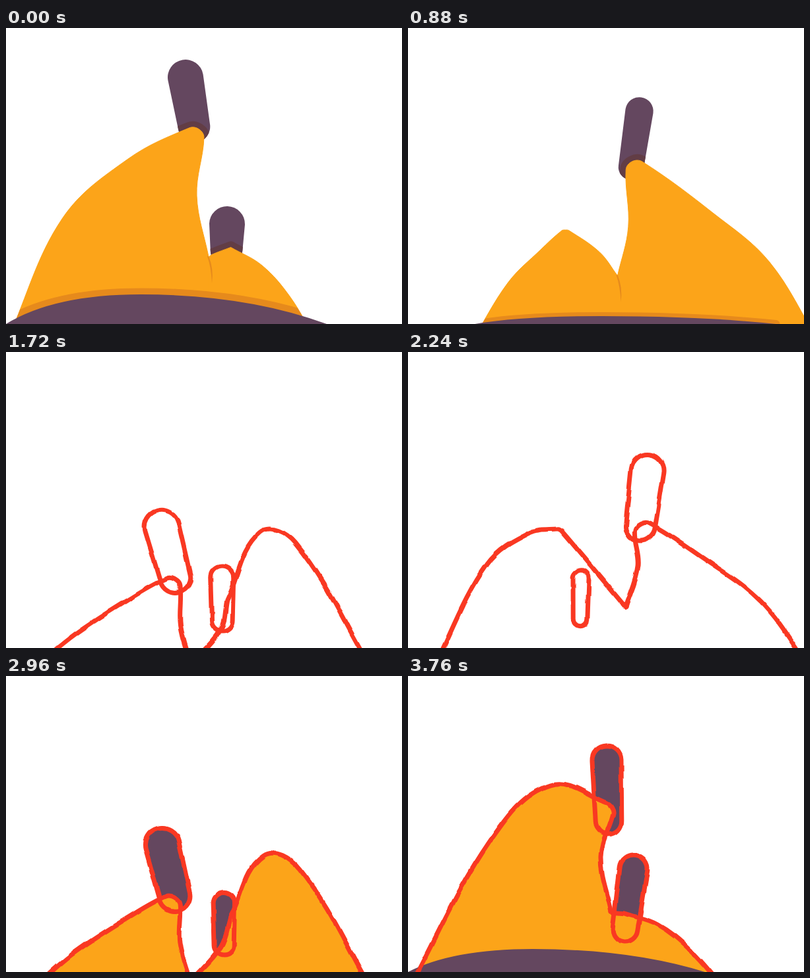
These frames come from a looping animation (600 px wide and 450 px high, 3.8 s). An HTML page:

```html
<!DOCTYPE html>
<html lang="en">
<head>
<meta charset="utf-8">
<title>Walk cycle</title>
<style>
html, body { margin: 0; width: 100%; height: 100%; overflow: hidden; background: #fff; }
svg { display: block; width: 100%; height: 100%; }
path { fill: none; stroke-linejoin: round; stroke-linecap: round; }
.shoe, .torso { fill: #64475f; }
.leg { fill: #fca419; stroke: #fca419; stroke-width: 1; }
.cuff { stroke: #623d45; stroke-width: 18; }
#band { stroke: #e68a1c; }
#crease { fill: #e68a1c; }
#ink path { stroke: #f93822; stroke-width: 7; }
</style>
</head>
<body>
<svg viewBox="0 0 600 450">
  <defs>
    <clipPath id="clipL"><path id="clipShoeL"/></clipPath>
    <clipPath id="clipR"><path id="clipShoeR"/></clipPath>
    <clipPath id="clipLegs"><path id="legsArea"/></clipPath>
    <filter id="handDrawn" filterUnits="userSpaceOnUse" x="-20" y="-20" width="640" height="490" color-interpolation-filters="sRGB">
      <feTurbulence id="noise" type="fractalNoise" baseFrequency="0.04" numOctaves="1" result="n"/>
      <feDisplacementMap in="SourceGraphic" in2="n" scale="6" xChannelSelector="R" yChannelSelector="G"/>
    </filter>
  </defs>
  <g id="paint">
    <path id="shoeL" class="shoe"/><path id="shoeR" class="shoe"/>
    <g class="shade">
      <g clip-path="url(#clipL)"><path id="cuffL" class="cuff"/></g>
      <g clip-path="url(#clipR)"><path id="cuffR" class="cuff"/></g>
    </g>
    <path id="legR" class="leg"/><path id="legL" class="leg"/>
    <g class="shade">
      <path id="crease"/>
      <g clip-path="url(#clipLegs)"><path id="band"/></g>
    </g>
    <path id="torso" class="torso"/>
  </g>
  <g id="ink" filter="url(#handDrawn)">
    <path id="inkShoeL"/><path id="inkShoeR"/><path id="inkLegL"/><path id="inkLegR"/>
  </g>
</svg>
<script>
const LOOP = 3800, STEP = 40, CYCLE = 1280, AXIS = 606, ANKLE = 17;
const $ = id => document.getElementById(id);

// leg: hip, thigh, knee, ankle centre, inner side; shoe: toe and heel centres;
// size: toe radius of each shoe; torso: left end, right end, top.
const pose = (t, crotch, legL, legR, shoeL, shoeR, size, torso) =>
  ({ t, crotch, legL, legR, shoeL, shoeR, size, torso });

const reachL = pose(0, [307,348],
  [4,470, 85,290, 185,199, 283,168, 289,255], [468,472, 430,408, 388,361, 337,350, 313,344],
  [272,75, 285,150], [335,298, 334,338], [27, 27], [0, 486, 405]);
const plantL = pose(120, [297,390],
  [0,472, 70,353, 150,272, 262,191, 277,290], [458,474, 425,436, 392,400, 343,394, 305,388],
  [256,98, 270,184], [321,370, 317,410], [22, 22], [40, 428, 425]);
const passR = pose(520, [286,478],
  [70,482, 130,442, 205,394, 255,388, 274,432], [556,480, 430,276, 374,263, 331,383, 322,424],
  [240,296, 262,374], [317,310, 316,390], [25, 20], [40, 480, 470]);
const reachR = pose(720, [314,424],
  [152,476, 172,446, 203,423, 266,428, 303,419], [592,480, 500,363, 430,268, 358,190, 345,270],
  [262,369, 276,420], [364,89, 353,176], [21, 28], [228, 520, 437]);
const swingL = pose(990, [330,388],
  [38,482, 120,323, 185,275, 222,285, 280,328], [612,484, 535,379, 440,308, 360,276, 349,325],
  [262,344, 261,406], [363,180, 352,264], [12, 25], [60, 520, 465]);
const kneeL = pose(1240, [308,358],
  [0,478, 125,250, 215,166, 294,208, 292,275], [480,476, 428,417, 378,378, 328,378, 311,359],
  [301,128, 304,221], [342,293, 329,385], [22, 21], [0, 450, 415]);

const flip = a => a.map((v, i) => i % 2 ? v : AXIS - v);
const mirror = (p, t) => pose(t, flip(p.crotch), flip(p.legR), flip(p.legL),
  flip(p.shoeR), flip(p.shoeL), [p.size[1], p.size[0]],
  [AXIS - p.torso[1], AXIS - p.torso[0], p.torso[2]]);

const poses = [
  reachL, plantL, mirror(swingL, 330), passR, mirror(kneeL, 620),
  reachR, mirror(plantL, 780), swingL, mirror(passR, 1140), kneeL
];

function slope(s0, s1, h0, h1) {
  const m = (h1 * s0 + h0 * s1) / (h0 + h1);
  const cap = 4 * Math.min(Math.abs(s0), Math.abs(s1)) + 0.2;
  return Math.max(-cap, Math.min(cap, m));
}

function poseAt(u) {
  const n = poses.length;
  let k = n - 1;
  while (poses[k].t > u) k--;
  const [a, b, c, d] = [-1, 0, 1, 2].map(o => poses[(k + o + n) % n]);
  const gap = (p, q) => (q.t - p.t + CYCLE) % CYCLE;
  const h0 = gap(a, b), h1 = gap(b, c), h2 = gap(c, d);
  const x = (u - b.t) / h1, y = 1 - x;
  const out = {};
  for (const key in b) {
    if (key === 't') continue;
    out[key] = b[key].map((v, i) => {
      const w = c[key][i], s = (w - v) / h1;
      const m0 = slope((v - a[key][i]) / h0, s, h0, h1);
      const m1 = slope(s, (d[key][i] - w) / h2, h1, h2);
      return v * (1 + 2 * x) * y * y + w * x * x * (3 - 2 * x)
        + h1 * (m0 * x * y * y - m1 * x * x * y);
    });
  }
  return out;
}

// Smooth open curve, handles scaled to each span.
function curve(pts) {
  const at = i => pts[Math.max(0, Math.min(pts.length - 1, i))];
  const dir = i => {
    const p = at(i - 1), q = at(i + 1);
    const x = q[0] - p[0], y = q[1] - p[1], len = Math.hypot(x, y) || 1;
    return [x / len, y / len];
  };
  let s = 'M' + pts[0];
  for (let i = 0; i < pts.length - 1; i++) {
    const p = at(i), q = at(i + 1), u = dir(i), v = dir(i + 1);
    const h = Math.hypot(q[0] - p[0], q[1] - p[1]) * 0.36;
    s += 'C' + [p[0] + u[0] * h, p[1] + u[1] * h, q[0] - v[0] * h, q[1] - v[1] * h, ...q];
  }
  return s;
}

// The outline wraps a circle at the ankle on its way from knee to crotch.
function legLine(a, crotch, side) {
  const [hip, thigh, knee, ankle, inner] = [0, 2, 4, 6, 8].map(i => a.slice(i, i + 2));
  const angle = (p, q) => Math.atan2(q[1] - p[1], q[0] - p[0]);
  const a1 = angle(knee, ankle), diff = angle(ankle, inner) - a1;
  const turn = Math.max(0, side * Math.atan2(Math.sin(diff), Math.cos(diff)));
  const wrap = [0, 0.5, 1].map(k => {
    const r = a1 + side * (turn * k - Math.PI / 2);
    return [ankle[0] + ANKLE * Math.cos(r), ankle[1] + ANKLE * Math.sin(r)];
  });
  return curve([hip, thigh, knee, ...wrap, inner, crotch]);
}

function shoePath([x1, y1, x2, y2], r) {
  const len = Math.hypot(x2 - x1, y2 - y1), heel = r * 0.9;
  const nx = (y1 - y2) / len, ny = (x2 - x1) / len;
  return `M${x1 + nx * r},${y1 + ny * r}A${r},${r} 0 0 1 ${x1 - nx * r},${y1 - ny * r}`
    + `L${x2 - nx * heel},${y2 - ny * heel}A${heel},${heel} 0 0 1 ${x2 + nx * heel},${y2 + ny * heel}Z`;
}

function torsoPath([l, r, top]) {
  const x = k => l + (r - l) * k;
  return `M${l},450Q${x(0.15)},${top} ${x(0.42)},${top}Q${x(0.75)},${top} ${r},450`;
}

const set = (id, d) => $(id).setAttribute('d', d);
const show = (el, on) => { el.style.display = on ? '' : 'none'; };

function draw(time) {
  const t = Math.floor(time % LOOP / STEP) * STEP;
  const mode = t < 1280 ? 'shaded' : t < 2520 ? 'sketch' : 'flat';
  const u = mode === 'shaded' ? t : mode === 'sketch' ? (t - 1280) / 1240 * CYCLE : t - 2520;
  const p = poseAt(u);

  show($('paint'), mode !== 'sketch');
  show($('ink'), mode !== 'shaded');
  document.querySelectorAll('.shade').forEach(g => show(g, mode === 'shaded'));
  $('noise').setAttribute('seed', t / STEP);

  const [x, y] = p.crotch;
  let area = '';
  ['L', 'R'].forEach((side, i) => {
    const leg = p['leg' + side];
    const line = legLine(leg, p.crotch, i ? -1 : 1);
    const body = `${line}L${x},520L${leg[0]},520Z`;
    const shoe = shoePath(p['shoe' + side], p.size[i]);
    set('leg' + side, body);
    set('cuff' + side, line);
    set('inkLeg' + side, line);
    for (const id of ['shoe', 'clipShoe', 'inkShoe']) set(id + side, shoe);
    area += body;
  });
  set('legsArea', area);

  const edge = torsoPath(p.torso);
  set('torso', edge + 'Z');
  set('band', edge);
  $('band').setAttribute('stroke-width', Math.max(0, Math.min(19, 450 - p.torso[2])));
  set('crease', `M${x - 2},${y - 1}Q${x + 4},${y + 16} ${x + 5},${y + 40}Q${x + 8},${y + 18} ${x},${y - 1}Z`);
}

const start = performance.now();
function tick() {
  draw(performance.now() - start);
  requestAnimationFrame(tick);
}
tick();
</script>
</body>
</html>
```
